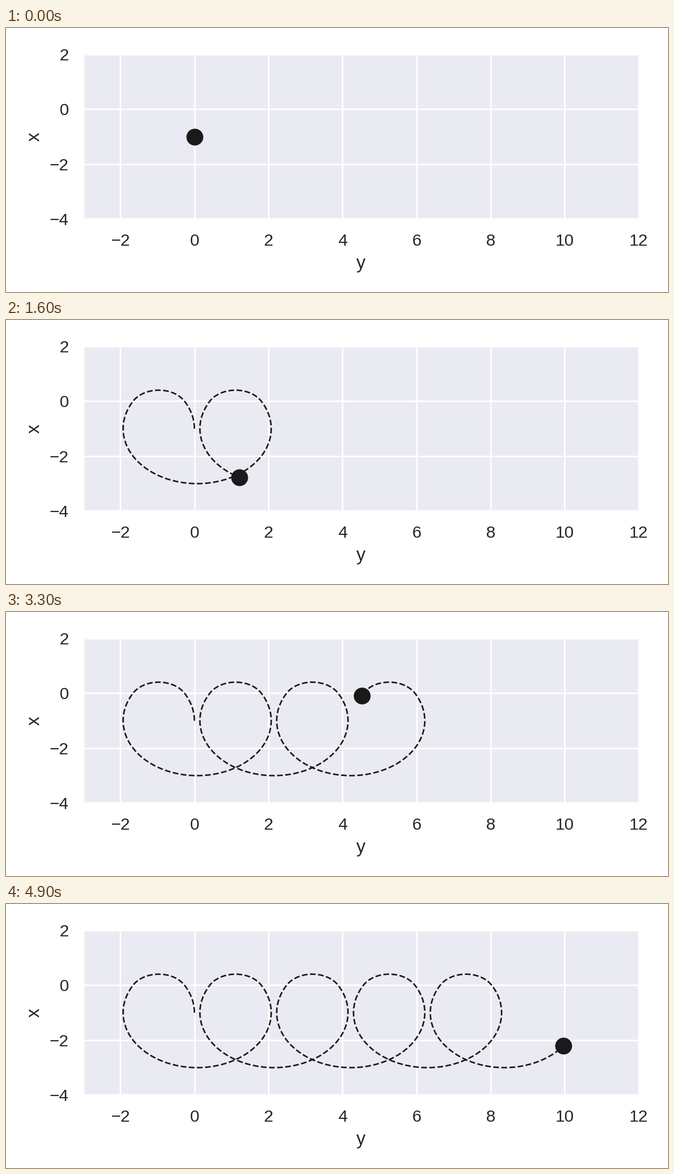
These frames come from a looping animation (1183x473 px, 5000 ms). A matplotlib script:

```python
import numpy as np
import matplotlib.pyplot as plt
from matplotlib.animation import FuncAnimation

W, H = 1183, 473
DPI = W / 6                   # the stage is six inches wide
FRAMES, INTERVAL = 50, 100
SUB = 20                      # path samples per frame
R_LOW, R_TOP = 2.0, 0.8025    # gyration radii below and above x = 0
INK, TEXT, PANEL = "#1a1a1a", "#262626", "#eaeaf2"

plt.rcParams.update({
    "font.family": "Liberation Sans",
    "axes.unicode_minus": True,
    "text.color": TEXT,
    "axes.labelcolor": TEXT,
})


def orbit(s):
    """Unit-speed gyration with a stronger field above x = 0."""
    a, b, c = np.pi / 6, 5 * np.pi / 6, 2 * np.pi
    ca = np.cos(a)
    s1 = R_LOW * a
    s2 = s1 + R_TOP * (b - a)
    period = s2 + R_LOW * (c - b)
    drift = 2 * ca * (R_LOW - R_TOP)

    turn, rest = np.divmod(s, period)
    phi = np.interp(rest, [0, s1, s2, period], [0, a, b, c])
    top = (phi > a) & (phi < b)
    x = np.where(top, R_TOP * (np.sin(phi) - 0.5), -1 + R_LOW * np.sin(phi))
    y_rise = R_LOW * (np.cos(phi) - 1)
    y_top = R_LOW * (ca - 1) + R_TOP * (np.cos(phi) - ca)
    y_fall = y_rise + drift
    y = np.where(top, y_top, np.where(phi <= a, y_rise, y_fall))
    return y + turn * drift, x


ys, xs = orbit(np.arange((FRAMES - 1) * SUB + 1) / SUB)

# the tiny margin keeps the pixel size from rounding down
fig = plt.figure(figsize=((W + 1e-6) / DPI, (H + 1e-6) / DPI), dpi=DPI,
                 facecolor="white")
left, right, top, bottom = 138.2, 1130.7, 47.0, 342.4
ax = fig.add_axes([left / W, 1 - bottom / H, (right - left) / W, (bottom - top) / H],
                  facecolor=PANEL)
ax.set(xlim=(-3, 12), ylim=(-4, 2),
       xticks=range(-2, 13, 2), yticks=range(-4, 3, 2))
ax.set_axisbelow(True)
ax.grid(color="white", lw=1)
ax.tick_params(length=6, pad=3.5, bottom=False, left=False,
               labelsize=11, labelcolor=TEXT)
for spine in ax.spines.values():
    spine.set(color="white", linewidth=1.25)
ax.set_xlabel("y", fontsize=12)
ax.set_ylabel("x", fontsize=12)

trail, = ax.plot([], [], "--", color=INK, lw=1)
ball, = ax.plot([], [], "o", color=INK, ms=10, mew=1)


def update(i):
    n = i * SUB
    trail.set_data(ys[:n + 1], xs[:n + 1])
    ball.set_data(ys[n:n + 1], xs[n:n + 1])
    return trail, ball


anim = FuncAnimation(fig, update, frames=FRAMES, interval=INTERVAL,
                     init_func=lambda: update(0), repeat=True, repeat_delay=0)
plt.show()
```
